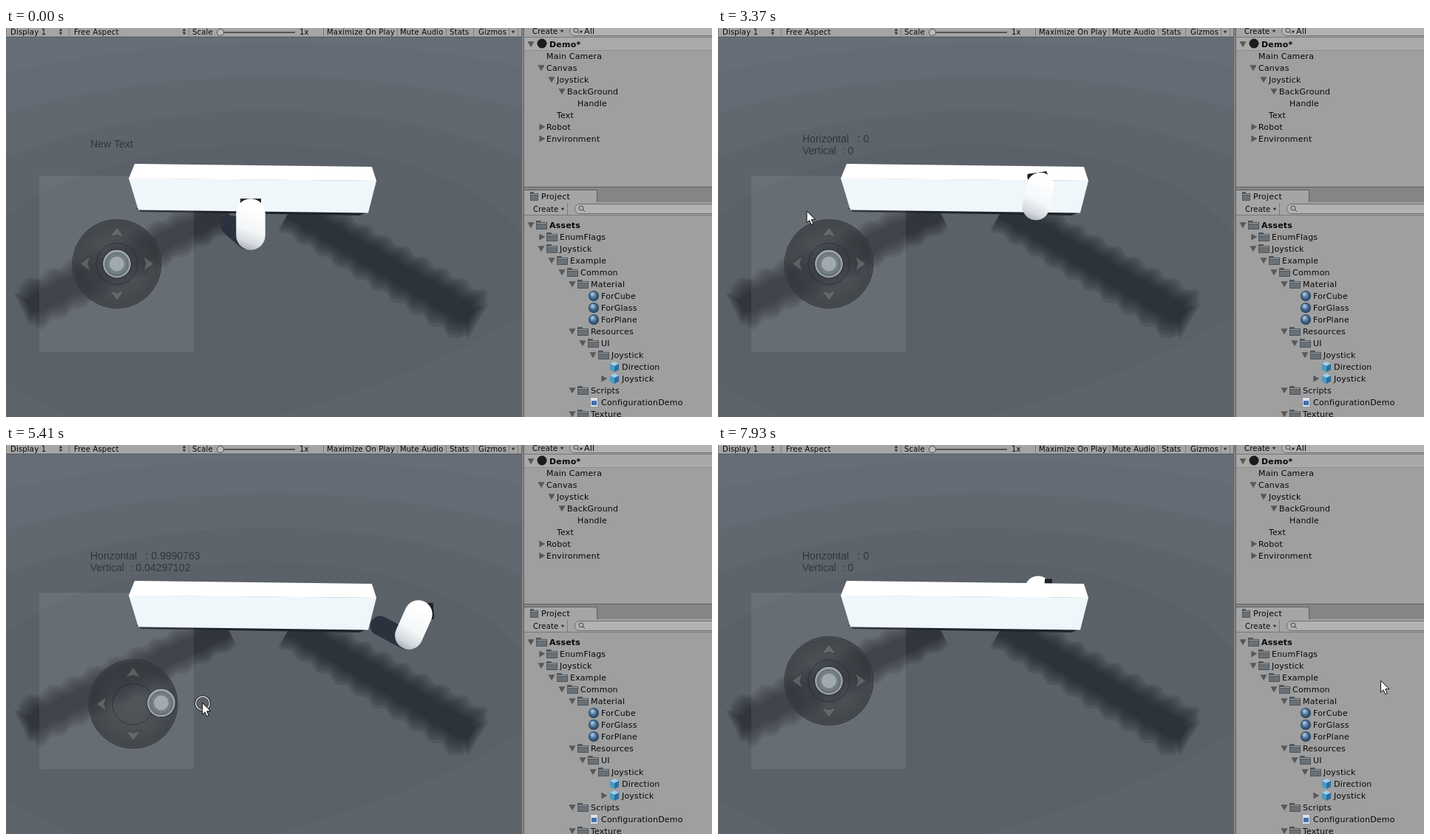
Recreate the animation shown at these times as an HTML page with a canvas. Size 955 by 527 pixels, loop 8 s.

```html
<!DOCTYPE html>
<html lang="en">
<head>
<meta charset="utf-8">
<title>Joystick demo</title>
<style>
html, body { margin: 0; width: 100%; height: 100%; overflow: hidden; background: #9f9f9f; }
canvas { display: block; }
</style>
</head>
<body>
<canvas id="stage" width="955" height="527"></canvas>
<script>
const W = 955, H = 527, LOOP = 8000, VIEW = 697, TAU = Math.PI * 2;
const stage = document.getElementById('stage').getContext('2d');

// ---- motion: a few key points, joined by smooth curves without overshoot ----
const cursorPath = [
  [370, 543, 110], [1010, 448, 247], [1330, 397, 340], [1810, 361, 367], [1930, 361, 367],
  [2410, 151, 327], [2730, 211, 336], [2770, 219, 325], [3010, 212, 256], [3610, 74, 246],
  [3730, 74, 246], [4050, 241, 322], [4090, 243, 318], [4450, 285, 330], [4690, 250, 418],
  [5050, 172, 351], [5170, 172, 351], [5370, 265, 347], [5410, 265, 349], [5770, 110, 252],
  [6010, 12, 345], [6570, 78, 404], [6610, 85, 411], [6850, 215, 420], [7210, 330, 351],
  [7810, 865, 324], [7930, 896, 319]
];
const robotPath = [
  [2410, 331, 281], [2770, 372, 304], [3370, 430, 242], [3850, 430, 242], [4450, 476, 256],
  [5170, 476, 256], [5410, 545, 258], [5650, 600, 235], [5890, 525, 198], [6610, 279, 194],
  [7210, 427, 222]
];
const presses = [
  { from: 2410, to: 3370, x: 151, y: 327 },
  { from: 3730, to: 4450, x: 74, y: 246 },
  { from: 5170, to: 7210, x: 172, y: 351 }
];
const HOME = { x: 150, y: 319.5 }, LAG = 40;

function along(path, t) {
  const last = path.length - 1;
  if (t <= path[0][0]) return path[0].slice(1);
  if (t >= path[last][0]) return path[last].slice(1);
  const i = path.findIndex(k => k[0] > t) - 1;
  const span = path[i + 1][0] - path[i][0], u = (t - path[i][0]) / span;
  return [1, 2].map(d => {
    const slope = k => (path[k + 1][d] - path[k][d]) / (path[k + 1][0] - path[k][0]);
    const tangent = k => {
      if (k === 0 || k === last) return slope(k ? last - 1 : 0);
      const a = slope(k - 1), b = slope(k);
      return a * b > 0 ? 2 * a * b / (a + b) : 0;
    };
    const a = path[i][d], rise = path[i + 1][d] - a;
    const m = tangent(i) * span, n = tangent(i + 1) * span;
    return a + u * (m + u * (3 * rise - 2 * m - n + u * (m + n - 2 * rise)));
  });
}

// The stick points from the pressed spot to where the cursor was a moment ago.
function heading(t) {
  const p = presses.filter(q => q.from < t).pop();
  if (!p) return [0, 1];
  const [x, y] = along(cursorPath, Math.min(t, p.to) - LAG);
  const dx = x - p.x, dy = p.y - y, n = Math.hypot(dx, dy);
  return [dx / n, dy / n];
}

// ---- drawing helpers ----
function poly(c, pts, fill) {
  c.beginPath();
  pts.forEach(p => c.lineTo(p[0], p[1]));
  c.closePath();
  c.fillStyle = fill;
  c.fill();
}
function disc(c, x, y, r, fill, stroke, width = 1) {
  c.beginPath();
  c.arc(x, y, r, 0, TAU);
  if (fill) { c.fillStyle = fill; c.fill(); }
  if (stroke) { c.strokeStyle = stroke; c.lineWidth = width; c.stroke(); }
}
function line(c, x1, y1, x2, y2, style, width) {
  c.beginPath();
  c.moveTo(x1, y1);
  c.lineTo(x2, y2);
  c.strokeStyle = style;
  c.lineWidth = width;
  c.stroke();
}
function rect(c, x, y, w, h, fill) { c.fillStyle = fill; c.fillRect(x, y, w, h); }
function shade(g, ...stops) {
  stops.forEach(([at, color]) => g.addColorStop(at, color));
  return g;
}
function label(c, s, x, y, size = 11, weight = '') {
  c.font = `${weight} ${size}px "DejaVu Sans", sans-serif`;
  c.letterSpacing = '0.2px';
  c.fillStyle = '#080808';
  c.fillText(s, x, y);
}
function triangle(c, x, y, r, turn, fill) {
  poly(c, [0, 1, 2].map(i => {
    const a = turn + i * TAU / 3;
    return [x + r * Math.cos(a), y + r * Math.sin(a)];
  }), fill);
}
function layer(paint) {
  const el = document.createElement('canvas');
  el.width = W;
  el.height = H;
  paint(el.getContext('2d'));
  return el;
}

// ---- ground and wall ----
function legShadow(c, x1, y1, x2, y2, half, alpha) {
  const len = Math.hypot(x2 - x1, y2 - y1), ux = (x2 - x1) / len, uy = (y2 - y1) / len;
  for (let k = 0; k < 6; k++) {
    const r = half * (1 - .12 * k), end = len + r * .55;
    const edge = side => Array.from({ length: 61 }, (_, i) => {
      const s = i / 60, d = s * end;
      const w = side * r * (.82 + .18 * s) * (1 + .09 * Math.sin(s * 62 + side)) * (s > .97 ? .75 : 1);
      return [x1 + ux * d - uy * w, y1 + uy * d + ux * w];
    });
    poly(c, [...edge(1), ...edge(-1).reverse()], `rgba(20,22,31,${alpha})`);
  }
}
const ground = layer(c => {
  rect(c, 0, 0, VIEW, H, '#666f78');
  for (let i = 0; i < 4; i++) {
    c.beginPath();
    c.ellipse(330, 420 - 20 * i, 830 - 145 * i, 400 - 66 * i, -.03, 0, TAU);
    c.fillStyle = `rgb(${99 - 3 * i},${107 - 3.5 * i},${116 - 4 * i})`;
    c.fill();
  }
  c.beginPath();
  c.moveTo(360, H);
  c.quadraticCurveTo(570, 470, VIEW, 390);
  c.lineTo(VIEW, H);
  c.fillStyle = '#5d646b';
  c.fill();
  legShadow(c, 300, 248, 38, 374, 33, .12);
  legShadow(c, 385, 246, 622, 386, 37, .14);
});
const wall = layer(c => {
  poly(c, [[176, 244], [490, 249], [478, 254], [182, 249]], '#20252d');
  poly(c, [[174, 184], [495, 188], [501, 207], [166, 204]], '#ffffff');
  poly(c, [[166, 203.5], [501, 207], [490, 250.5], [179, 246.5]], '#f0f7fb');
});

// ---- editor panels ----
function folder(c, x, y, w = 15) {
  rect(c, x, y - 6, w * .45, 3, '#50565b');
  rect(c, x, y - 4, w, 10, '#50565b');
  rect(c, x + 1, y - 3, w - 2, 1, '#a4a9ad');
  rect(c, x + 1, y - 1, w - 2, 6, '#697076');
}
function ball(c, x, y) {
  disc(c, x, y, 7, shade(c.createRadialGradient(x - 2, y - 3, 1, x, y, 7),
    [0, '#a9c4dc'], [.5, '#4d7399'], [1, '#203a55']));
}
function cube(c, x, y) {
  const side = s => [[x + 6 * s, y - 4], [x, y - 1], [x, y + 7], [x + 6 * s, y + 4]];
  poly(c, [[x, y - 7], [x + 6, y - 4], [x, y - 1], [x - 6, y - 4]], '#9fd0ea');
  poly(c, side(-1), '#4a9ac6');
  poly(c, side(1), '#2b6f9c');
}
function page(c, x, y) {
  rect(c, x - 5, y - 7, 11, 14, '#8d949b');
  rect(c, x - 4, y - 6, 9, 12, '#dfe3e8');
  rect(c, x - 3, y - 2, 7, 6, '#3f6fb0');
}
function search(c, x, y) {
  c.beginPath();
  c.roundRect(x, y, W - x + 20, 13, 7);
  c.fillStyle = '#b2b2b2';
  c.fill();
  c.strokeStyle = '#6c6c6c';
  c.lineWidth = 1;
  c.stroke();
  disc(c, x + 8.5, y + 5.5, 3, null, '#444');
  line(c, x + 10.5, y + 7.5, x + 13.5, y + 10.5, '#444', 1);
}
const fold = (c, x, y, open) => triangle(c, x, y - (open ? 1 : 0), 5.3, open ? TAU / 4 : 0, '#585858');
const caret = (c, x, y, up) => triangle(c, x, y, 2.6, up ? -TAU / 4 : TAU / 4, '#333');

function viewBar(c) {
  rect(c, 0, 0, VIEW, 13, '#a5a5a5');
  rect(c, 0, 11, VIEW, 1, '#8c8c8c');
  rect(c, 0, 12, VIEW, 1, '#555a5f');
  [0, 85, 247, 429, 529, 595, 632, 680, 692].forEach(x => rect(c, x, 0, 1, 11, '#7d7d7d'));
  Object.entries({ 'Display 1': 6, 'Free Aspect': 92, Scale: 252, '1x': 397, 'Maximize On Play': 434,
    'Mute Audio': 533, Stats: 600, Gizmos: 639 }).forEach(([s, x]) => label(c, s, x, 8.5, 10));
  [74, 241].forEach(x => { caret(c, x, 3, true); caret(c, x, 7); });
  caret(c, 686, 5);
  rect(c, 290, 5, 101, 2, '#555');
  disc(c, 290, 6, 4.5, '#bdbdbd', '#4c4c4c');
}

// Indented rows: ">" marks depth, "+" an open row, "-" a closed one.
function tree(c, text, x, y, drawIcon) {
  text.trim().split(/\s*\n\s*/).forEach((row, i) => {
    const [, depth, mark, name] = row.match(/^(>*)([+-]?)(.*)$/);
    const rx = x + depth.length * 14, ry = y + i * 16;
    if (mark) fold(c, rx, ry, mark === '+');
    drawIcon(name, rx, ry, depth.length, mark);
  });
}

const panels = layer(c => {
  viewBar(c);
  rect(c, VIEW, 0, W - VIEW, H, '#9f9f9f');
  rect(c, VIEW, 0, 4, H, '#858585');
  [697, 700].forEach(x => rect(c, x, 0, 1, H, '#656565'));

  // hierarchy
  rect(c, 701, 0, 254, 12, '#a5a5a5');
  rect(c, 701, 12, 254, 1, '#777');
  rect(c, 701, 13, 254, 17, '#a9a9a9');
  rect(c, 701, 30, 254, 1, '#8f8f8f');
  label(c, 'Create', 712, 8, 10);
  caret(c, 752, 4);
  search(c, 762.5, -2.5);
  caret(c, 778, 5);
  label(c, 'All', 782, 8);
  fold(c, 710, 22, true);
  disc(c, 725, 21, 6.5, '#1c1c1c');
  label(c, 'Demo*', 735, 26, 11, 'bold');
  tree(c, `>Main Camera
    >+Canvas
    >>+Joystick
    >>>+BackGround
    >>>>Handle
    >>Text
    >-Robot
    >-Environment`, 710, 38, (name, x, y) => label(c, name, x + 7, y + 4));

  // project
  rect(c, 701, 215, 254, 21, '#858585');
  rect(c, 701, 215, 254, 1, '#5f5f5f');
  rect(c, 700, 219, 100, 17, '#5f5f5f');
  rect(c, 701, 220, 98, 34, '#a5a5a5');
  rect(c, 701, 236, 254, 18, '#a5a5a5');
  rect(c, 701, 253, 254, 1, '#777');
  folder(c, 709, 228, 11);
  label(c, 'Project', 724, 232);
  label(c, 'Create', 713, 249, 10);
  caret(c, 753, 245);
  rect(c, 759, 237, 1, 16, '#7d7d7d');
  search(c, 769.5, 238.5);
  tree(c, `+Assets
    >-EnumFlags
    >+Joystick
    >>+Example
    >>>+Common
    >>>>+Material
    >>>>>ForCube
    >>>>>ForGlass
    >>>>>ForPlane
    >>>>+Resources
    >>>>>+UI
    >>>>>>+Joystick
    >>>>>>>Direction
    >>>>>>>-Joystick
    >>>>+Scripts
    >>>>>ConfigurationDemo
    >>>>+Texture`, 710, 267, (name, x, y, depth, mark) => {
    if (depth > 6) cube(c, x + 15, y);
    else if (mark) folder(c, x + 7, y);
    else (name.startsWith('For') ? ball : page)(c, x + 15, y);
    label(c, name, x + 25, y + 4, 11, depth ? '' : 'bold');
  });
});

// ---- moving parts ----
function body(x, y) {
  const k = 1 + (y - 281) * .00175, lean = (x - 331) * .06;
  return { x, y, k, lean, r: 19.7 * k, tx: x + lean, ty: y - 30 * k };
}

function robotShadow(c, { x, y, k, lean }) {
  c.lineCap = 'round';
  line(c, x - 5, y + 5, x - 26 - lean, y - 13, '#2a323d', 28 * k);
}

function visor(c, { tx, ty, k }, [fx, fy]) {
  const at = (ahead, side, up) => [
    tx + k * (fx * ahead + fy * side),
    ty + k * (-.6 * (fy * ahead - fx * side) - 4 - up)
  ];
  const face = up => [at(10, -14, up), at(21, -14, up), at(21, 14, up), at(10, 14, up)];
  const low = face(-3), top = face(3);
  low.forEach((p, i) => {
    const j = (i + 1) % 4;
    poly(c, [p, low[j], top[j], top[i]], '#16191e');
  });
  poly(c, top, '#1d2126');
}

function robot(c, b, dir) {
  const away = dir[1] > 0;
  if (away) visor(c, b, dir);
  const skin = shade(c.createLinearGradient(b.tx + b.r * .4, b.ty - b.r * .3, b.x - b.r * .6, b.y + b.r),
    [0, '#ffffff'], [.5, '#f4f6f8'], [.78, '#d6dbe0'], [1, '#a2a9b1']);
  c.lineCap = 'round';
  line(c, b.tx, b.ty, b.x, b.y, skin, 2 * b.r);
  if (!away) {
    visor(c, b, dir);
    disc(c, b.tx, b.ty, b.r * .66, '#fcfdfe');
  }
}

function joystick(c, { x, y }, [sx, sy]) {
  disc(c, x, y, 60, shade(c.createRadialGradient(x, y, 10, x, y, 60),
    [0, 'rgba(58,61,65,.5)'], [.5, 'rgba(54,57,61,.58)'], [1, 'rgba(46,49,53,.66)']), 'rgba(30,32,36,.6)');
  disc(c, x, y, 59, null, 'rgba(130,136,142,.25)');
  disc(c, x, y, 28, null, 'rgba(25,28,32,.45)');
  for (let i = 0; i < 4; i++) {
    c.save();
    c.translate(x, y);
    c.rotate(i * TAU / 4);
    poly(c, [[0, -50], [10, -36], [0, -39], [-10, -36]], 'rgba(125,129,132,.5)');
    c.strokeStyle = 'rgba(45,48,52,.6)';
    c.lineWidth = 1;
    c.stroke();
    c.restore();
  }
  const hx = x + 38 * sx, hy = y - 38 * sy;
  disc(c, hx, hy, 20, 'rgba(35,38,42,.55)');
  disc(c, hx, hy, 18, shade(c.createLinearGradient(0, hy - 19, 0, hy + 19), [0, '#8f999f'], [1, '#6e777d']),
    '#a9b3b8', 1.5);
  disc(c, hx, hy, 15, '#747e85', '#5a646a');
  disc(c, hx, hy, 10, '#a0aaaf');
}

function pointer(c, x, y, down) {
  if (down) {
    disc(c, x + 1, y + 1, 9.5, null, '#1a1a1a', 2.6);
    disc(c, x + 1, y + 1, 9.3, null, '#f4f4f4', 1.3);
  }
  poly(c, [[.5, .5], [.5, 16], [4, 12.7], [6.6, 18.6], [9.2, 17.4], [6.7, 11.7], [11.5, 11.5]]
    .map(p => [x + p[0], y + p[1]]), '#ffffff');
  c.strokeStyle = '#111';
  c.lineWidth = 1;
  c.stroke();
}

function readout(c, t, stick) {
  const [h, v] = stick.map(n => String(+n.toPrecision(7)));
  c.font = '14px "Liberation Sans", Arial, sans-serif';
  c.fillStyle = '#33363a';
  if (t < presses[0].from) {
    c.fillText('New Text', 114, 162);
  } else {
    c.fillText('Horizontal   : ' + h, 114, 155);
    c.fillText('Vertical  : ' + v, 114, 171);
  }
}

function draw(t) {
  const c = stage;
  const press = presses.find(p => t >= p.from && t < p.to);
  const dir = heading(t);
  const stick = press && t > press.from ? dir : [0, 0];
  const bot = body(...along(robotPath, t));
  const behind = bot.y < 230;

  c.drawImage(ground, 0, 0);
  robotShadow(c, bot);
  if (behind) robot(c, bot, dir);
  c.drawImage(wall, 0, 0);
  if (!behind) robot(c, bot, dir);

  rect(c, 45, 200, 209, 239, 'rgba(255,255,255,.075)');
  readout(c, t, stick);
  joystick(c, press || HOME, stick);
  c.drawImage(panels, 0, 0);
  if (t >= cursorPath[0][0]) pointer(c, ...along(cursorPath, t), !!press);
}

// The picture advances every 120 ms.
const tick = t => t < 130 ? 0 : Math.floor((t - 10) / 120) * 120 + 10;
const start = performance.now();
function frame(now) {
  draw(tick(Math.max(0, now - start) % LOOP));
  requestAnimationFrame(frame);
}
draw(0);
requestAnimationFrame(frame);
</script>
</body>
</html>
```
